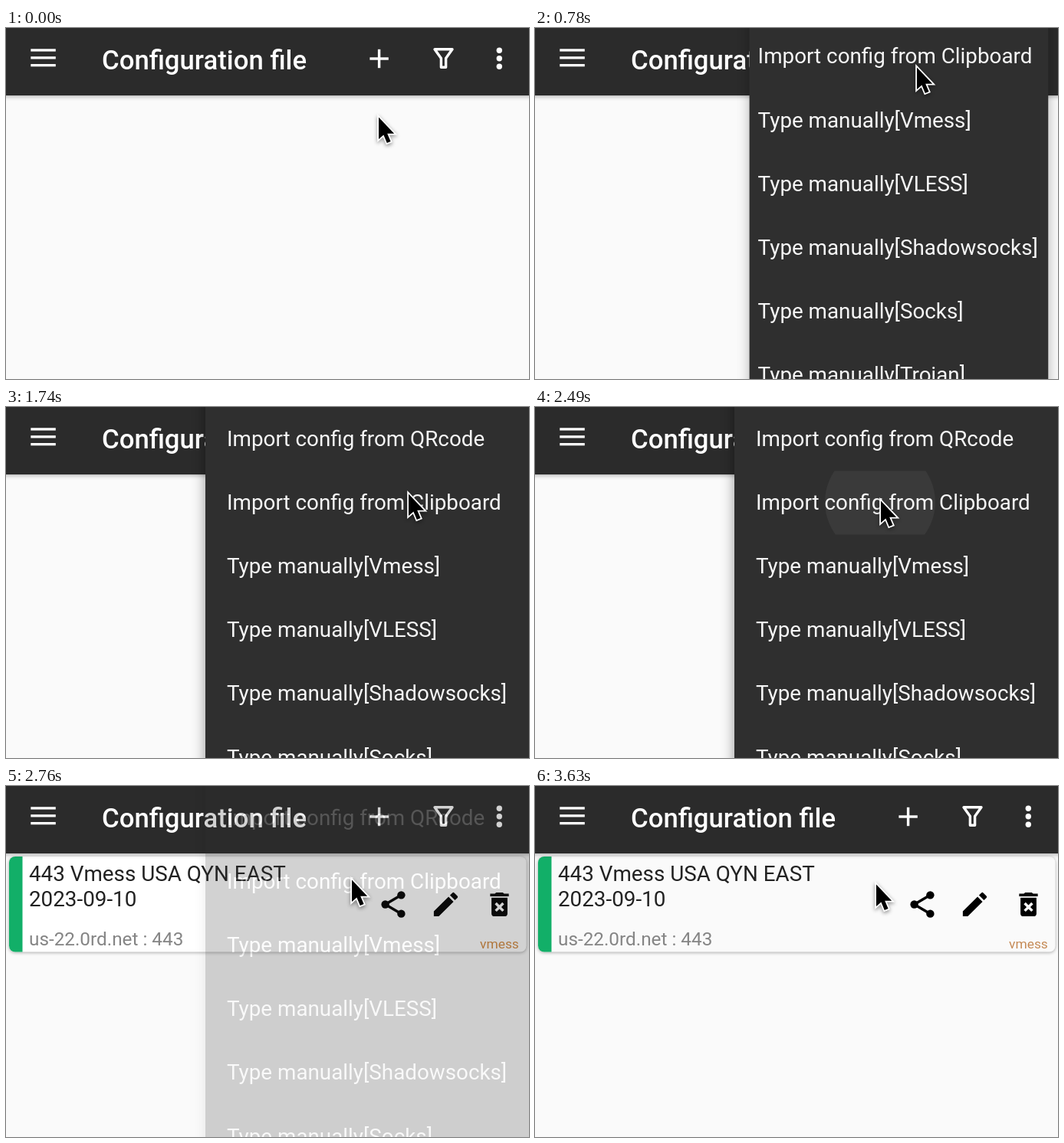
Animation of 682 by 458 pixels, one loop 3690 ms. Source, as an HTML page with a canvas:

```html
<!DOCTYPE html>
<html lang="en">
<head>
<meta charset="utf-8">
<title>Import a configuration</title>
<style>
  html, body { margin: 0; width: 100%; height: 100%; overflow: hidden; background: #fafafa; }
  canvas { display: block; }
</style>
</head>
<body>
<canvas id="stage" width="682" height="458"></canvas>
<script>
const W = 682, H = 458, LOOP = 3690, STEP = 30, DP = 1.735;
const ctx = document.getElementById('stage').getContext('2d');
const layer = document.createElement('canvas');
layer.width = W;
layer.height = H;
const menuCtx = layer.getContext('2d');

const ROWS = [
  'Import config from QRcode', 'Import config from Clipboard',
  'Type manually[Vmess]', 'Type manually[VLESS]',
  'Type manually[Shadowsocks]', 'Type manually[Socks]', 'Type manually[Trojan]'
];
const ROW_H = 83.2;

// Pointer stops: time, x, y
const STOPS = [
  [0, 485, 115], [330, 497, 50], [900, 497, 50], [1020, 489, 57], [1050, 489, 57],
  [1560, 527, 108], [1620, 527, 108], [1740, 524, 112], [2010, 450, 121],
  [3540, 450, 121], [3630, 444, 127]
];

const PENCIL = new Path2D('M3 17.25V21h3.75L17.81 9.94l-3.75-3.75zM20.71 7.04a1 1 0 0 0 0-1.41l-2.34-2.34a1 1 0 0 0-1.41 0l-1.83 1.83 3.75 3.75z');
const BIN = new Path2D('M6 19c0 1.1.9 2 2 2h8c1.1 0 2-.9 2-2V7H6zM8.46 11.88l1.41-1.41L12 12.59l2.12-2.12 1.41 1.41L13.41 14l2.12 2.12-1.41 1.41L12 15.41l-2.12 2.12-1.41-1.41L10.59 14zM15.5 4l-1-1h-5l-1 1H5v2h14V4z');
const SHARE_LINES = new Path2D('M18 5L6 12L18 19');
const FUNNEL = new Path2D('M559 27.8H582L573.6 39.5V51.2H567.4V39.5Z');
const ARROW = new Path2D('M1 1.5V30L7.4 24.4L11.8 35L16.6 33L12.2 22.8H21.2Z');

const clamp = v => Math.min(1, Math.max(0, v));
const span = (t, a, b) => clamp((t - a) / (b - a));
const lerp = (a, b, k) => a + (b - a) * k;
const smooth = k => k * k * (3 - 2 * k);

function text(c, str, x, y, size, color, weight = 400) {
  c.font = `${weight} ${size}px Roboto, sans-serif`;
  c.fillStyle = color;
  c.fillText(str, x, y);
}

function disc(c, x, y, r) {
  c.beginPath();
  c.arc(x, y, r, 0, Math.PI * 2);
  c.fill();
}

function shadow(c, color, blur, dy) {
  c.shadowColor = color;
  c.shadowBlur = blur;
  c.shadowOffsetY = dy;
}

function icon(cx, cy, draw) {
  ctx.save();
  ctx.translate(cx, cy);
  ctx.scale(DP, DP);
  ctx.translate(-12, -12);
  draw();
  ctx.restore();
}

function drawHeader(t) {
  ctx.save();
  shadow(ctx, 'rgba(0,0,0,.35)', 6, 1);
  ctx.fillStyle = '#2b2b2b';
  ctx.fillRect(-10, -10, W + 20, 98);
  ctx.restore();

  if (t >= 540 && t < 900) {
    const a = 0.2 * span(t, 510, 600) * (1 - span(t, 750, 900));
    ctx.fillStyle = `rgba(255,255,255,${a})`;
    disc(ctx, 489, 42, lerp(12, 35, span(t, 510, 690)));
  }

  ctx.fillStyle = '#fff';
  for (const y of [27.3, 37.2, 47]) ctx.fillRect(32.3, y, 32.5, 3.3);
  text(ctx, 'Configuration file', 125, 53.5, 34.7, '#fff', 500);
  ctx.fillRect(474.4, 38.3, 24.4, 3.4);
  ctx.fillRect(484.9, 27.8, 3.4, 24.4);
  ctx.strokeStyle = '#fff';
  ctx.lineWidth = 3.4;
  ctx.lineJoin = 'round';
  ctx.stroke(FUNNEL);
  for (const y of [29.3, 39.8, 50.3]) disc(ctx, 643.3, y, 3.7);
}

function drawCard(t) {
  ctx.save();
  ctx.globalAlpha = span(t, 2550, 2640);
  ctx.save();
  shadow(ctx, 'rgba(0,0,0,.32)', 4, 1);
  ctx.fillStyle = t < 3570 ? '#fff' : '#fafafa';
  ctx.beginPath();
  ctx.roundRect(4, 92, 674.5, 124.5, 8);
  ctx.fill();
  ctx.restore();

  ctx.fillStyle = '#12af68';
  ctx.beginPath();
  ctx.roundRect(4, 92, 17.5, 124.5, [8, 0, 0, 8]);
  ctx.fill();

  text(ctx, '443 Vmess USA QYN EAST', 30, 123.5, 27.8, '#222');
  text(ctx, '2023-09-10', 30, 156.5, 27.8, '#222');
  text(ctx, 'us-22.0rd.net : 443', 30, 208, 24.3, '#858585');
  text(ctx, 'vmess', 618, 212, 17.4, t < 3570 ? '#d38a40' : '#c58a55');

  ctx.fillStyle = ctx.strokeStyle = '#000';
  icon(505, 154.5, () => {
    ctx.lineWidth = 2;
    ctx.stroke(SHARE_LINES);
    disc(ctx, 18, 5, 3);
    disc(ctx, 6, 12, 3);
    disc(ctx, 18, 19, 3);
  });
  icon(573.5, 154.5, () => ctx.fill(PENCIL));
  icon(643.5, 154.5, () => ctx.fill(BIN, 'evenodd'));
  ctx.restore();
}

function drawMenu(t) {
  const u = span(t, 630, 880);
  const alpha = span(t, 630, 733) * (1 - span(t, 2610, 2800));
  if (!alpha) return;

  // The panel is revealed from the plus button while its rows slide down.
  const grow = 1 - (1 - u) ** 2.45;
  const slide = smooth(u ** 0.8);
  const left = lerp(445, 260, grow);
  const right = lerp(528, 686, grow);
  const bottom = lerp(81, 764, slide ** 1.55);

  const c = menuCtx;
  c.clearRect(0, 0, W, H);
  c.save();
  shadow(c, `rgba(0,0,0,${0.4 * slide})`, 16, 4);
  c.fillStyle = '#2f2f2f';
  c.fillRect(left, -20, right - left, bottom + 20);
  c.restore();

  c.save();
  c.beginPath();
  c.rect(left, 0, right - left, bottom);
  c.clip();
  if (t >= 2490) {
    const a = 0.1 * span(t, 2460, 2520) * (1 - span(t, 2550, 2670));
    c.save();
    c.beginPath();
    c.rect(left, ROW_H, right - left, ROW_H);
    c.clip();
    c.fillStyle = `rgba(255,255,255,${a})`;
    disc(c, 450, 124, lerp(30, 240, span(t, 2460, 2610)));
    c.restore();
  }
  c.translate(10 * (1 - slide), -333 * (1 - slide));
  ROWS.forEach((row, i) => text(c, row, 288, 50.5 + i * ROW_H, 27.8, '#f6f6f6'));
  c.restore();

  ctx.globalAlpha = alpha;
  ctx.drawImage(layer, 0, 0);
  ctx.globalAlpha = 1;
}

function pointerAt(t) {
  const n = STOPS.findIndex(s => s[0] > t);
  if (n < 0) return STOPS[STOPS.length - 1].slice(1);
  const [t0, x0, y0] = STOPS[n - 1], [t1, x1, y1] = STOPS[n];
  const k = smooth(span(t, t0, t1));
  return [lerp(x0, x1, k), lerp(y0, y1, k)];
}

function drawPointer(t) {
  const [x, y] = pointerAt(t);
  ctx.save();
  ctx.translate(x, y);
  ctx.lineJoin = 'miter';
  ctx.lineWidth = 3.6;
  ctx.strokeStyle = '#fff';
  ctx.save();
  shadow(ctx, 'rgba(0,0,0,.45)', 5, 2);
  ctx.stroke(ARROW);
  ctx.restore();
  ctx.fillStyle = '#000';
  ctx.fill(ARROW);
  ctx.restore();
}

function draw(t) {
  ctx.fillStyle = '#fafafa';
  ctx.fillRect(0, 0, W, H);
  if (t > 2550) drawCard(t);
  drawHeader(t);
  drawMenu(t);
  drawPointer(t);
}

const start = performance.now();
function tick() {
  const t = (performance.now() - start) % LOOP;
  draw(Math.floor(t / STEP) * STEP);
  requestAnimationFrame(tick);
}
tick();
</script>
</body>
</html>
```
